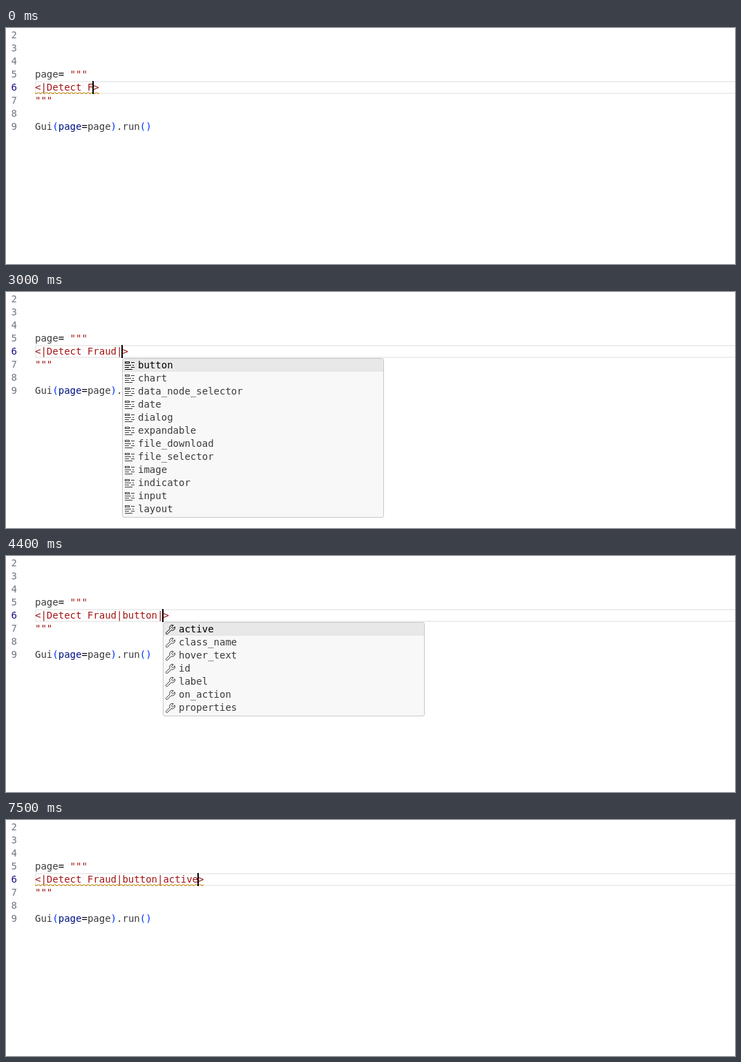
These frames come from a looping animation (1055x343 px, 7900 ms). An HTML page:

```html
<!DOCTYPE html>
<html lang="en">
<head>
<meta charset="utf-8">
<title>Editor completion</title>
<style>
  html, body { margin: 0; width: 100%; height: 100%; overflow: hidden; background: #fff; }
  #stage {
    position: relative; width: 1055px; height: 343px; overflow: hidden;
    font: 14px/19px "DejaVu Sans Mono", monospace; color: #3b3b3b; white-space: pre;
  }
  #stage div, #stage svg { position: absolute; }
  .num { left: 7.57px; color: #6e7681; }
  .num.on { color: #171184; }
  .code { left: 42px; }
  .str { color: #a31515; }
  .op { color: #000; }
  .arg { color: #001080; }
  .par { color: #0431fa; }
  #band { left: 42px; top: 77px; width: 1030px; height: 19px; box-sizing: border-box; border: 2px solid #eee; }
  #wave { left: 42px; top: 93px; height: 3px; }
  #caret { top: 77px; width: 2px; height: 19px; background: #000; }
  .menu {
    top: 96px; width: 379px; box-sizing: border-box; overflow: hidden;
    background: #f8f8f8; border: 1px solid #c8c8c8; border-radius: 3px;
  }
  .item { left: 0; width: 100%; height: 19px; padding-left: 22px; }
  .item.on { background: #e8e8e8; color: #000; }
  .item svg { left: 2px; top: 2px; }
  #bar { right: 0; top: 0; width: 10px; height: 103px; background: rgba(100, 100, 100, .4); }
</style>
</head>
<body>
<div id="stage">
  <div id="band"></div>
  <svg id="wave" width="0" height="3">
    <defs>
      <pattern id="zig" width="6" height="3" patternUnits="userSpaceOnUse">
        <path fill="#bf8803" d="M5.5 0 2.5 3H1.1L4.1 0ZM4 0 6 2V.6L5.4 0ZM0 2 1 3H2.4L0 .6Z"/>
      </pattern>
    </defs>
    <rect width="100%" height="3" fill="url(#zig)"/>
  </svg>
</div>
<script>
const LOOP = 7900, CHAR = 14 * 1233 / 2048, LEFT = 42, ROW = 19;
const stage = document.getElementById('stage');
const wave = document.getElementById('wave');

function add(parent, cls, top, html) {
  const el = document.createElement('div');
  el.className = cls;
  el.style.top = top + 'px';
  el.innerHTML = html;
  parent.append(el);
  return el;
}
const span = (cls, text) => `<span class="${cls}">${text}</span>`;
const lineTop = n => 1 + (n - 2) * ROW;

for (let n = 2; n <= 9; n++) add(stage, n === 6 ? 'num on' : 'num', lineTop(n), n);
add(stage, 'code', lineTop(5), 'page' + span('op', '=') + ' ' + span('str', '"""'));
const typed = add(stage, 'code str', lineTop(6), '');
add(stage, 'code', lineTop(7), span('str', '"""'));
add(stage, 'code', lineTop(9), 'Gui' + span('par', '(') + span('arg', 'page') + span('op', '=') +
  'page' + span('par', ')') + '.run' + span('par', '()'));

const icon = body => `<svg width="16" height="16" viewBox="0 0 16 16">${body}</svg>`;
const keyIcon = icon('<path fill="currentColor" fill-rule="evenodd" d="M1 2h7v3H1zM2 3v1h5V3z' +
  'M10 3h5v1h-5zM1 7h9v1H1zM12 7h2v1h-2zM1 10h6v1H1zM10 10h5v1h-5zM1 13h11v1H1z"/>');
const toolIcon = icon('<path fill="none" stroke="currentColor" d="M12.2 1.7A3.8 3.8 0 0 0 7.2 6.9' +
  'L1.8 12.3a1.3 1.3 0 0 0 1.9 1.9L9.2 8.8A3.8 3.8 0 0 0 14.2 3.8L11.4 6.5 9.5 4.6Z"/>');

function menu(left, symbol, names) {
  const el = add(stage, 'menu', 96, '');
  el.style.left = left + 'px';
  el.style.height = names.length * ROW + 4 + 'px';
  names.forEach((name, i) => add(el, i ? 'item' : 'item on', i * ROW, symbol + name));
  return el;
}
const controls = menu(168, keyIcon, ['button', 'chart', 'data_node_selector', 'date', 'dialog',
  'expandable', 'file_download', 'file_selector', 'image', 'indicator', 'input', 'layout']);
const props = menu(227, toolIcon, ['active', 'class_name', 'hover_text', 'id', 'label',
  'on_action', 'properties']);
const bar = add(controls, '', 0, '');
bar.id = 'bar';
const caret = add(stage, '', 77, '');
caret.id = 'caret';

// Each step changes only the listed properties.
const steps = [
  [0, { text: '<|Detect F', caret: 1, wave: 1, menu: null, bar: 1 }],
  [300, { caret: 0 }],
  [600, { text: '<|Detect Fr', caret: 1 }],
  [700, { text: '<|Detect Fra' }],
  [800, { text: '<|Detect Frau' }],
  [1000, { text: '<|Detect Fraud' }],
  [1400, { caret: 0 }],
  [1700, { text: '<|Detect Fraud|', caret: 1 }],
  [1800, { wave: 0 }],
  [1900, { menu: controls }],
  [2200, { caret: 0 }],
  [2500, { bar: .8 }],
  [2700, { bar: .4, caret: 1 }],
  [2800, { bar: .15 }],
  [3000, { bar: 0 }],
  [3200, { text: '<|Detect Fraud|button', wave: 1, menu: null }],
  [3700, { caret: 0 }],
  [4200, { text: '<|Detect Fraud|button|', caret: 1 }],
  [4300, { wave: 0 }],
  [4400, { menu: props }],
  [4800, { caret: 0 }],
  [5300, { caret: 1 }],
  [5800, { caret: 0 }],
  [6300, { caret: 1 }],
  [6400, { text: '<|Detect Fraud|button|active', menu: null }],
  [6500, { wave: 1 }],
  [7000, { caret: 0 }],
  [7500, { caret: 1 }]
];

const show = (el, on) => { el.style.visibility = on ? 'visible' : 'hidden'; };

function draw(time) {
  const s = {};
  for (const [at, change] of steps) if (at <= time) Object.assign(s, change);
  const line = s.text + '>';
  if (typed.textContent !== line) typed.textContent = line;
  wave.setAttribute('width', line.length * CHAR);
  caret.style.left = Math.round(LEFT + s.text.length * CHAR) - 1 + 'px';
  bar.style.opacity = s.bar;
  show(wave, s.wave);
  show(caret, s.caret);
  show(controls, s.menu === controls);
  show(props, s.menu === props);
}

const start = performance.now();
function tick() {
  draw((performance.now() - start) % LOOP);
  requestAnimationFrame(tick);
}
tick();
</script>
</body>
</html>
```
